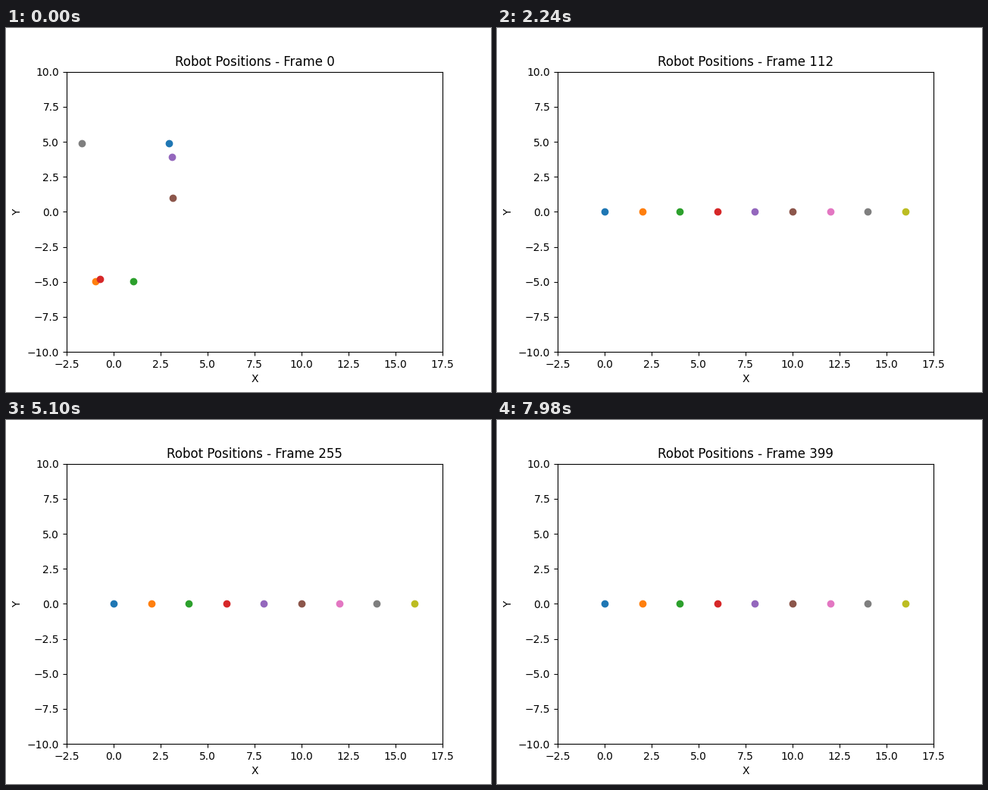
A matplotlib script for the animation above (8 s loop, 640 px wide and 480 px high).

```python
import math

import matplotlib.pyplot as plt
from matplotlib.animation import FuncAnimation

FRAMES = 400
INTERVAL = 20
SPACING = 2

# where each robot starts before joining the line
STARTS = [(2.95, 4.9), (-0.96, -4.96), (1.05, -4.96),
          (-0.73, -4.8), (3.1, 3.92), (3.15, 1),
          (-3.5, -3.2), (-1.69, 4.9), (-4, 2.9)]

fig, ax = plt.subplots(figsize=(6.4, 4.8), dpi=100)
ax.set(xlim=(-2.5, 17.5), ylim=(-10, 10), xlabel="X", ylabel="Y")
title = ax.set_title("", pad=5.4)
dots = [ax.plot([], [], "o")[0] for _ in STARTS]


def keep(i):
    """Share of the error robot i keeps per step; it varies more down the line."""
    return 0.81 + 0.0075 * i * math.cos(1.75 * (i - 8.29))


def position(i, step):
    """Each robot closes in on its slot in the line exponentially."""
    x, y = STARTS[i]
    goal = SPACING * i
    left = keep(i) ** step
    return goal + (x - goal) * left, y * left


def update(step):
    for i, dot in enumerate(dots):
        x, y = position(i, step)
        dot.set_data([x], [y])
    title.set_text(f"Robot Positions - Frame {step}")
    return dots + [title]


anim = FuncAnimation(fig, update, frames=FRAMES, interval=INTERVAL,
                     repeat=True, repeat_delay=0, blit=False)
plt.show()
```
